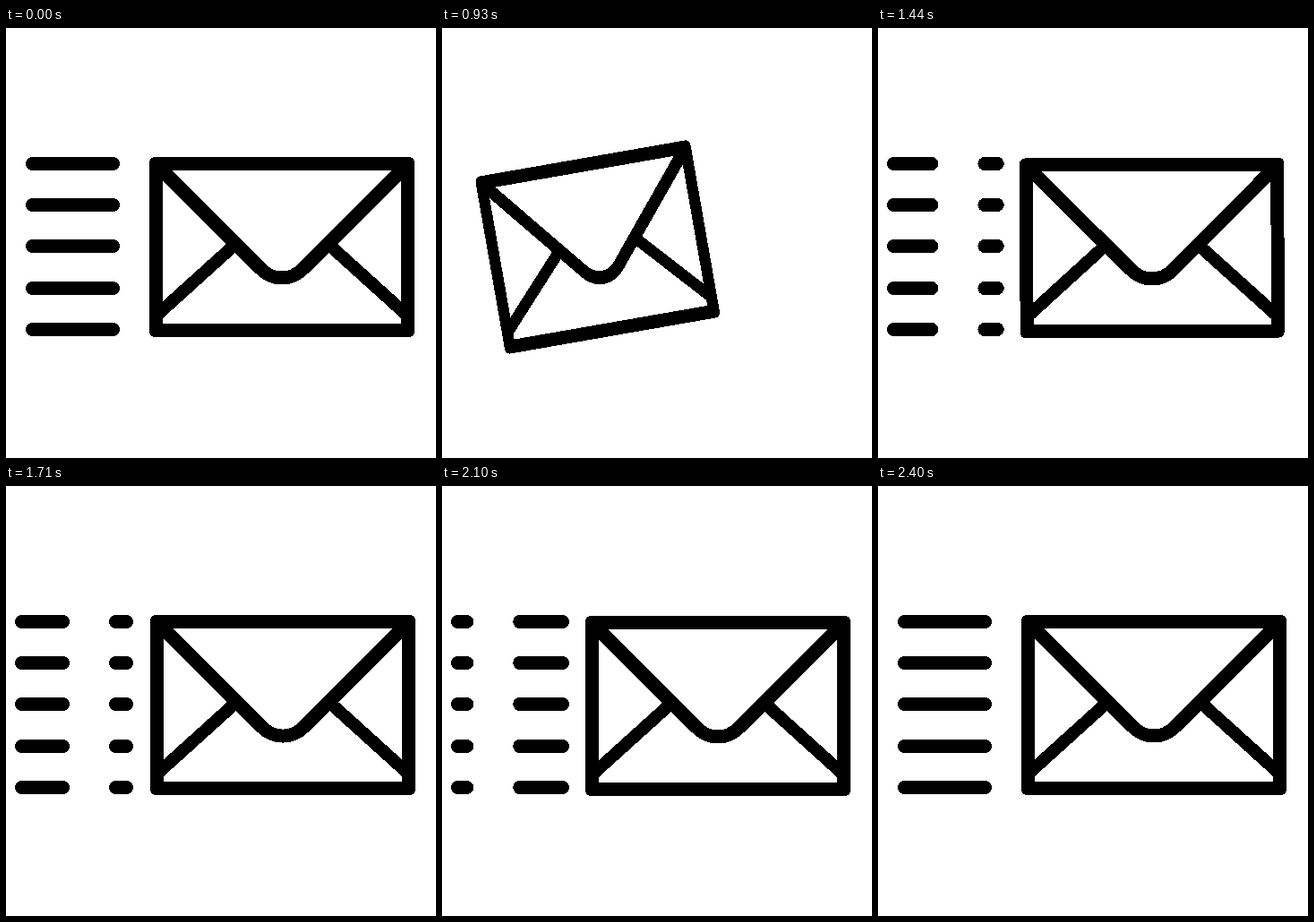
An HTML page that plays this animation: 480 by 480 pixels, repeating every 2430 ms.

```html
<!DOCTYPE html>
<html lang="en">
<head>
<meta charset="utf-8">
<title>Sending mail</title>
<style>
  html, body { margin: 0; width: 100%; height: 100%; overflow: hidden; background: #fff; }
  svg { display: block; width: 100%; height: 100%; }
</style>
</head>
<body>
<svg viewBox="0 0 480 480" shape-rendering="crispEdges">
  <g id="lines" fill="none" stroke="#000" stroke-width="15" stroke-linecap="round"></g>
  <g id="mail">
    <path fill-rule="evenodd" d="M-141 -100.5H141Q148 -100.5 148 -93.5V93.5Q148 100.5 141 100.5H-141Q-148 100.5 -148 93.5V-93.5Q-148 -100.5 -141 -100.5ZM-133 -85.5V85.5H133V-85.5Z"/>
    <g fill="none" stroke="#000" stroke-width="15">
      <path d="M-141 -93L-24 24C-10 38 10 38 24 24L141 -93"/>
      <path stroke-width="14" d="M-141 77.3L-53 -2.2M141 77.3L53 -2.2"/>
    </g>
  </g>
</svg>
<script>
const LOOP = 2430, STEP = 30, HOLD = 630;
const DASH = 90, GAP = 59, PERIOD = DASH + GAP;
const mail = document.getElementById('mail');
const group = document.getElementById('lines');

const rows = [151.5, 197.5, 243.5, 290.5, 336.5].map(y => {
  const row = document.createElementNS('http://www.w3.org/2000/svg', 'line');
  row.setAttribute('y1', y);
  row.setAttribute('y2', y);
  group.appendChild(row);
  return row;
});

// Smooth progress from 0 to 1 between times a and b
function ease(t, a, b) {
  const u = Math.min(1, Math.max(0, (t - a) / (b - a)));
  return u * u * (3 - 2 * u);
}

function setRows(x1, x2, dash, offset) {
  group.setAttribute('visibility', x2 > x1 ? 'visible' : 'hidden');
  for (const row of rows) {
    row.setAttribute('x1', x1);
    row.setAttribute('x2', Math.max(x1, x2));
    row.setAttribute('stroke-dasharray', dash);
    row.setAttribute('stroke-dashoffset', offset);
  }
}

function drawMail(t, pull) {
  let dx = -141 * pull, dy = 0;
  if (t > 1470 && t < 1950) dx += Math.sin((t - 1470) / 480 * Math.PI) ** 2;
  if (t > 1110) dy = 0.5 + 0.5 * Math.cos((t - 1440) / 330 * Math.PI);
  mail.setAttribute('transform',
    `translate(${308 + dx} ${244.5 + dy}) rotate(${-10.4 * pull}) scale(${1 - 0.186 * pull} 1)`);
}

function drawLines(t, pull) {
  if (t < 1170) {
    setRows(29.5, 29.5 + DASH * (1 - 1.17 * pull), 'none', 0);
    return;
  }
  // Dashes stream left and brake, revealed behind the envelope
  const left = 550 * (1 - ease(t, 900, 2400));
  const end = Math.min(134.5, 135 - 122 * pull);
  setRows(17.5, end, `${DASH} ${GAP}`, -((12 + left) % PERIOD));
}

function draw(now) {
  const t = Math.floor((now % LOOP) / STEP) * STEP;
  const pull = t < HOLD ? 0 : ease(t, 340, 1020) * (1 - ease(t, 1050, 1470));
  drawMail(t, pull);
  drawLines(t, pull);
}

let start = null;
function tick(now) {
  if (start === null) start = now;
  draw(now - start);
  requestAnimationFrame(tick);
}
draw(0);
requestAnimationFrame(tick);
</script>
</body>
</html>
```
